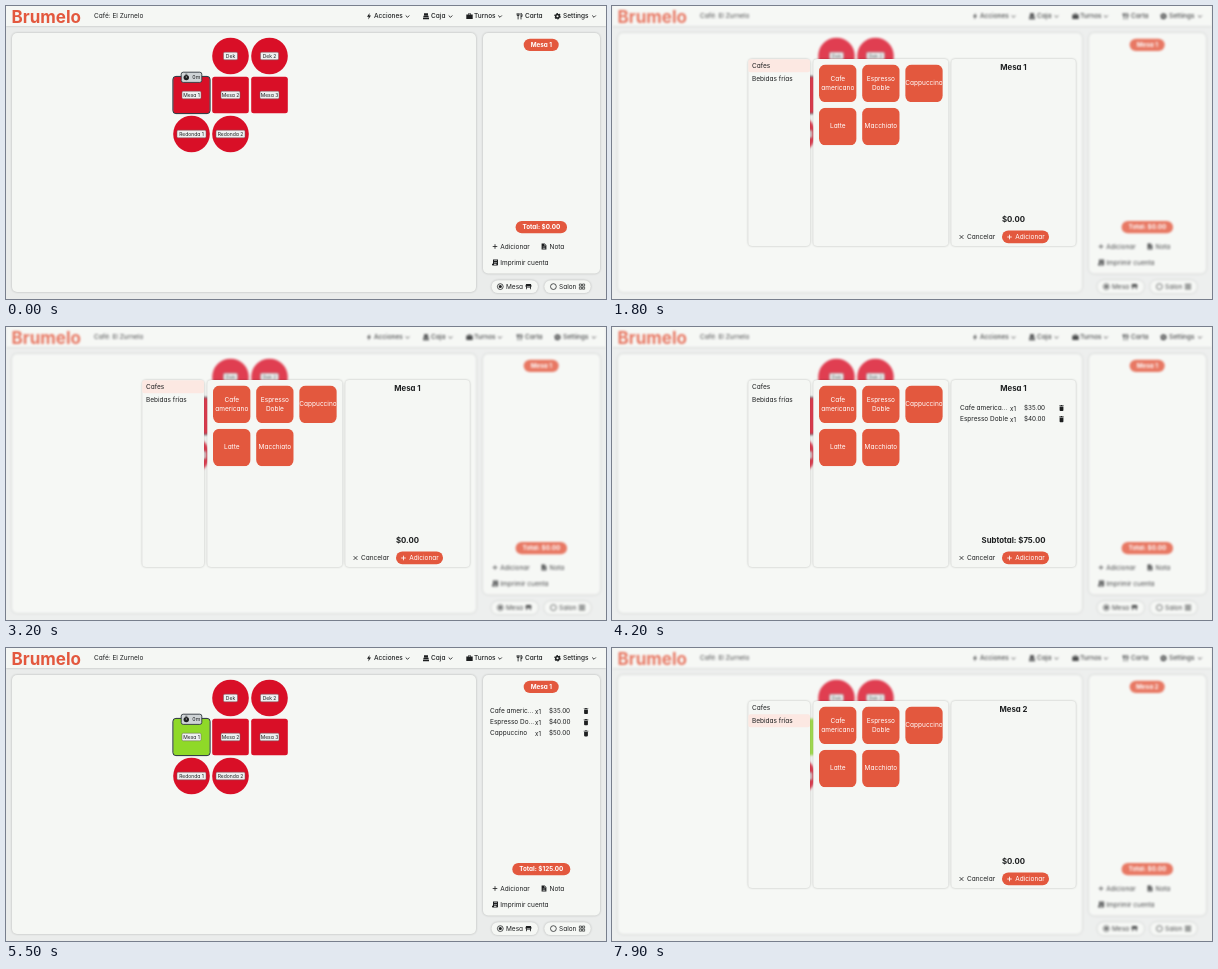
These frames come from a looping animation (600 px wide and 293 px high, 8000 ms). An HTML page:

```html
<!DOCTYPE html>
<html lang="es">
<head>
<meta charset="utf-8">
<title>Mesas</title>
<style>
  html, body { margin: 0; width: 100%; height: 100%; overflow: hidden; background: #eaeceb; }
  svg { display: block; width: 100vw; height: 100vh; }
  text {
    font-family: Inter, "Open Sans", sans-serif;
    font-feature-settings: "cv11";
    dominant-baseline: central;
    white-space: pre;
  }
  .soft { filter: drop-shadow(0 .7px .8px rgba(0, 0, 0, .24)); }
  .blurred { filter: blur(1px); }
</style>
</head>
<body>
<svg id="stage" viewBox="0 0 600 293" preserveAspectRatio="none"></svg>
<script>
const LOOP = 8000;
const ORANGE = '#e3583e', PAPER = '#f5f7f4', INK = '#1d1f20', RED = '#d90f27', GREEN = '#8fd928';
const MENU = [
  ['Cafe americano', 'Cafe america...', 'Cafe americ...', 35],
  ['Espresso Doble', 'Espresso Doble', 'Espresso Do...', 40],
  ['Cappuccino', 'Cappuccino', 'Cappuccino', 50],
  ['Latte'], ['Macchiato']
];
const TABLES = [
  ['Dek', 1, 0, 14], ['Dek 2', 2, 0, 18],
  ['Mesa 1', 0, 1, 19], ['Mesa 2', 1, 1, 19], ['Mesa 3', 2, 1, 19],
  ['Redonda 1', 0, 2, 29], ['Redonda 2', 1, 2, 29]
];

const money = n => '$' + n.toFixed(2);
const clamp = v => Math.max(0, Math.min(1, v));
const within = (t, from, to) => t >= from && t < to;

const rect = (x, y, w, h, r, fill, extra = '') =>
  `<rect x="${x}" y="${y}" width="${w}" height="${h}" rx="${r}" fill="${fill}" ${extra}/>`;
const circle = (x, y, r, fill, extra = '') =>
  `<circle cx="${x}" cy="${y}" r="${r}" fill="${fill}" ${extra}/>`;
const text = (s, x, y, { size = 6.5, weight = 400, fill = INK, anchor = 'start' } = {}) =>
  `<text x="${x}" y="${y}" font-size="${size}" font-weight="${weight}" fill="${fill}" text-anchor="${anchor}">${s}</text>`;
const centered = (s, x, y, style = {}) => text(s, x, y, { ...style, anchor: 'middle' });
const card = (x, y, w, h, r = 5) => rect(x, y, w, h, r, PAPER, 'class="soft"');

// Icons are drawn around their own centre.
const solid = d => `<path d="${d}" fill="${INK}" fill-rule="evenodd"/>`;
const line = (d, color = INK, w = .8) => `<path d="${d}" fill="none" stroke="${color}" stroke-width="${w}"/>`;
const ICONS = {
  bolt: solid('M.6-3.2-2 .5H-.3L-.7 3.2 2-.6H.3Z'),
  register: solid('M-2-3H2V-1H-2ZM-2.2-.6H2.2L3 1.4H-3ZM-3 1.8H3V3H-3Z'),
  briefcase: solid('M-3.2-1.8H-1.3V-3H1.3V-1.8H3.2V2.8H-3.2ZM-.7-2.4V-1.8H.7V-2.4Z'),
  cutlery: line('M-2.4-3V-.8H-.4V-3M-1.4-3V3.2M1.5 3.2V-3Q2.8-2.6 2.6.2H1.5', INK, .85),
  gear: circle(0, 0, 1.8, 'none', `stroke="${INK}" stroke-width="1.5"`) +
    circle(0, 0, 2.7, 'none', `stroke="${INK}" stroke-width="1.1" stroke-dasharray="1.5 1.327"`),
  chevron: line('M-1.8-.8 0 1 1.8-.8', INK, .9),
  plus: line('M-2.3 0H2.3M0-2.3V2.3'),
  plusLight: line('M-2.3 0H2.3M0-2.3V2.3', '#fff'),
  cross: line('M-1.9-1.9 1.9 1.9M-1.9 1.9 1.9-1.9'),
  note: solid('M-2.4-3.1H.7L2.4-1.3V3.1H-2.4ZM.4-2.5V-.9H1.9ZM-1.3.2V.7H1.3V.2ZM-1.3 1.4V1.9H1.3V1.4Z'),
  receipt: solid('M-2-3H3V2.2Q3 3 2.2 3H-2.2Q-3 3-3 2.2V1.2H-2ZM-1-2V-1.5H2V-2ZM-1-.6V-.1H2V-.6ZM-1 1.2H1.4V2.2H-1Z'),
  trash: solid('M-2.3-2.6H-1L-.6-3.1H.6L1-2.6H2.3V-1.9H-2.3ZM-1.9-1.4H1.9V2.2Q1.9 3 1.1 3H-1.1Q-1.9 3-1.9 2.2Z'),
  tableTop: solid('M-2.4-2.5H2.4L3.2-.2H-3.2ZM-2.5-.2H-1.7V2.7H-2.5ZM1.7-.2H2.5V2.7H1.7ZM-1.7.6H1.7V1.1H-1.7Z'),
  grid: line('M-2.6-2.6H-.5V-.5H-2.6ZM.5-2.6H2.6V-.5H.5ZM-2.6.5H-.5V2.6H-2.6ZM.5.5H2.6V2.6H.5Z', INK, .65),
  radio: circle(0, 0, 2.9, 'none', `stroke="${INK}" stroke-width=".75"`),
  dot: circle(0, 0, 1.5, INK),
  timer: circle(0, .4, 2.7, INK) + solid('M-1-3.4H1V-2.7H-1Z') + line('M0-1V.7', '#dfe3e4', .6)
};
const icon = (name, x, y) => `<g transform="translate(${x} ${y})">${ICONS[name]}</g>`;

function header() {
  const items = [
    ['bolt', 363, 'Acciones', 368, 401.5], ['register', 420, 'Caja', 425, 444.5],
    ['briefcase', 463.5, 'Turnos', 468, 494], ['cutlery', 513.5, 'Carta', 519],
    ['gear', 551.5, 'Settings', 557, 588]
  ];
  return rect(0, -2, 600, 22, 0, PAPER, 'class="soft"') +
    text('Brumelo', 5.5, 10.5, { size: 17, weight: 700, fill: ORANGE }) +
    text('Café: El Zurnelo', 88, 10.3) +
    items.map(([name, ix, label, x, cx]) =>
      icon(name, ix, 10.2) + text(label, x, 10.3, { weight: 450 }) + (cx ? icon('chevron', cx, 10.3) : '')
    ).join('');
}

function tableMarkup([name, col, row, tagWidth], state) {
  const x = 185.5 + 39 * col, y = 50 + 39 * row;
  const fill = name === 'Mesa 1' && state.served ? GREEN : RED;
  const shape = row === 1 ? rect(x - 18.3, y - 18.3, 36.6, 36.6, 2.5, fill) : circle(x, y, 18.3, fill);
  const tag = rect(x - tagWidth / 2, y - 3.8, tagWidth, 7.6, 1.3, '#eef0f0', 'stroke="#6c6064" stroke-width=".5"') +
    centered(name, x, y, { size: 5 });
  const glow = state.focus(name);
  const ring = glow > 0
    ? rect(x - 18.6, y - 18.6, 37.2, 37.2, 3, 'none', `stroke="#24303a" stroke-width="1" opacity="${glow}"`) : '';
  return shape + ring + tag;
}

function timerTag(col) {
  const x = 185.5 + 39 * col;
  return rect(x - 10.3, 66.2, 20.6, 10.2, 2, '#cfd4d6', 'stroke="#30383e" stroke-width=".9"') +
    icon('timer', x - 5.2, 71.2) + text('0m', x + .8, 71.4, { size: 5.3 });
}

function orderRows(items, x, y, priceX, trashX, nameIndex) {
  return items.map((item, i) => {
    const rowY = y + 11.2 * i;
    return text(item[nameIndex], x, rowY) + text('x1', priceX - 14, rowY, { size: 6.2 }) +
      text(money(item[3]), priceX, rowY, { size: 6.3 }) + icon('trash', trashX, rowY);
  }).join('');
}

const total = items => items.reduce((sum, item) => sum + item[3], 0);

function sidebar(state) {
  const sum = total(state.order), half = sum ? 29 : 25.7;
  const pillText = { size: 6.3, weight: 700, fill: '#fff' };
  return card(477, 27, 117, 240.5) +
    rect(517.7, 32.7, 35, 12.4, 6.2, ORANGE) + centered(state.table, 535.3, 39, pillText) +
    orderRows(state.order, 484, 63, 543, 580, 2) +
    rect(535.3 - half, 215, 2 * half, 12.3, 6.1, ORANGE) + centered('Total: ' + money(sum), 535.3, 221.2, pillText) +
    (state.hover ? rect(481, 234, 47, 13, 6.5, '#e5e8e6') : '') +
    icon('plus', 489, 240.5) + text('Adicionar', 494.3, 240.5) +
    icon('note', 538, 240.5) + text('Nota', 543.5, 240.5) +
    icon('receipt', 489, 256.5) + text('Imprimir cuenta', 494.3, 256.5) +
    card(485.5, 274.2, 46.5, 12.8, 6.4) + icon('radio', 494.3, 280.6) + icon('dot', 494.3, 280.6) +
    text('Mesa', 500, 280.6) + icon('tableTop', 522.5, 280.6) +
    card(538.3, 274.2, 46.5, 12.8, 6.4) + icon('radio', 547.4, 280.6) +
    text('Salon', 553, 280.6) + icon('grid', 576, 280.6);
}

function menuButton([name], i) {
  const x = 207 + 43.1 * (i % 3), y = 58.5 + 43.2 * Math.floor(i / 3);
  const words = name.split(' ');
  return `<svg x="${x}" y="${y}" width="37.6" height="37.6">` + rect(0, 0, 37.6, 37.6, 6.5, ORANGE) +
    words.map((word, k) =>
      centered(word, 18.8, 18.8 + (k - (words.length - 1) / 2) * 9.6, { fill: '#fff' })).join('') + '</svg>';
}

function modal(state) {
  const highlight = (y, amount) => amount > 0
    ? rect(136.3, y, 61.7, 13, 2, '#fce8e2', `opacity="${amount}"`) : '';
  const sum = total(state.cart);
  const bold = { size: 7.8, weight: 700 };
  return rect(0, 0, 600, 293, 0, '#f9fbfa', 'opacity=".2"') +
    card(136.3, 53, 61.7, 187, 4) + highlight(53.2, state.coffeeHover) + highlight(66.2, state.drinksHover) +
    text('Cafes', 140, 59.6) + text('Bebidas frías', 140, 72.6) +
    card(201.3, 53, 135, 187, 4) + MENU.map(menuButton).join('') +
    card(339.3, 53, 124.5, 187, 4) + centered(state.table, 401.5, 61.4, bold) +
    orderRows(state.cart, 348, 81, 412, 449.5, 1) +
    centered((sum ? 'Subtotal: ' : '') + money(sum), 401.5, 213, bold) +
    icon('cross', 349.5, 231) + text('Cancelar', 355, 231) +
    rect(390, 224.5, 47, 12.7, 6.3, ORANGE) + icon('plusLight', 397.5, 231) +
    text('Adicionar', 403.2, 231, { fill: '#fff' });
}

function stateAt(t) {
  const second = t >= 6400, served = t >= 5500;
  const added = t >= 5500 ? 0 : [3500, 3900, 4400].filter(at => t >= at).length;
  const shift = clamp((t - 6400) / 300);
  return {
    served,
    table: second ? 'Mesa 2' : 'Mesa 1',
    column: second ? 1 : 0,
    focus: name => name === 'Mesa 1' ? 1 - shift : name === 'Mesa 2' ? shift : 0,
    order: served && !second ? MENU.slice(0, 3) : [],
    cart: MENU.slice(0, added),
    hover: within(t, 600, 900) || within(t, 7100, 7400),
    open: within(t, 900, 5500) || t >= 7400,
    coffeeHover: within(t, 1500, 5500) ? 1 - clamp((t - 3250) / 300) : 0,
    drinksHover: clamp((t - 7600) / 250)
  };
}

function render(t) {
  const state = stateAt(t);
  return `<g class="${state.open ? 'blurred' : ''}">` + rect(-10, -10, 620, 313, 0, '#eaeceb') +
    header() + card(6, 27, 464, 259) +
    TABLES.map(table => tableMarkup(table, state)).join('') + timerTag(state.column) +
    sidebar(state) + '</g>' + (state.open ? modal(state) : '');
}

const stage = document.getElementById('stage');
const start = performance.now();
let shown = '';
function tick() {
  const markup = render((performance.now() - start) % LOOP);
  if (markup !== shown) stage.innerHTML = shown = markup;
  requestAnimationFrame(tick);
}
tick();
</script>
</body>
</html>
```
